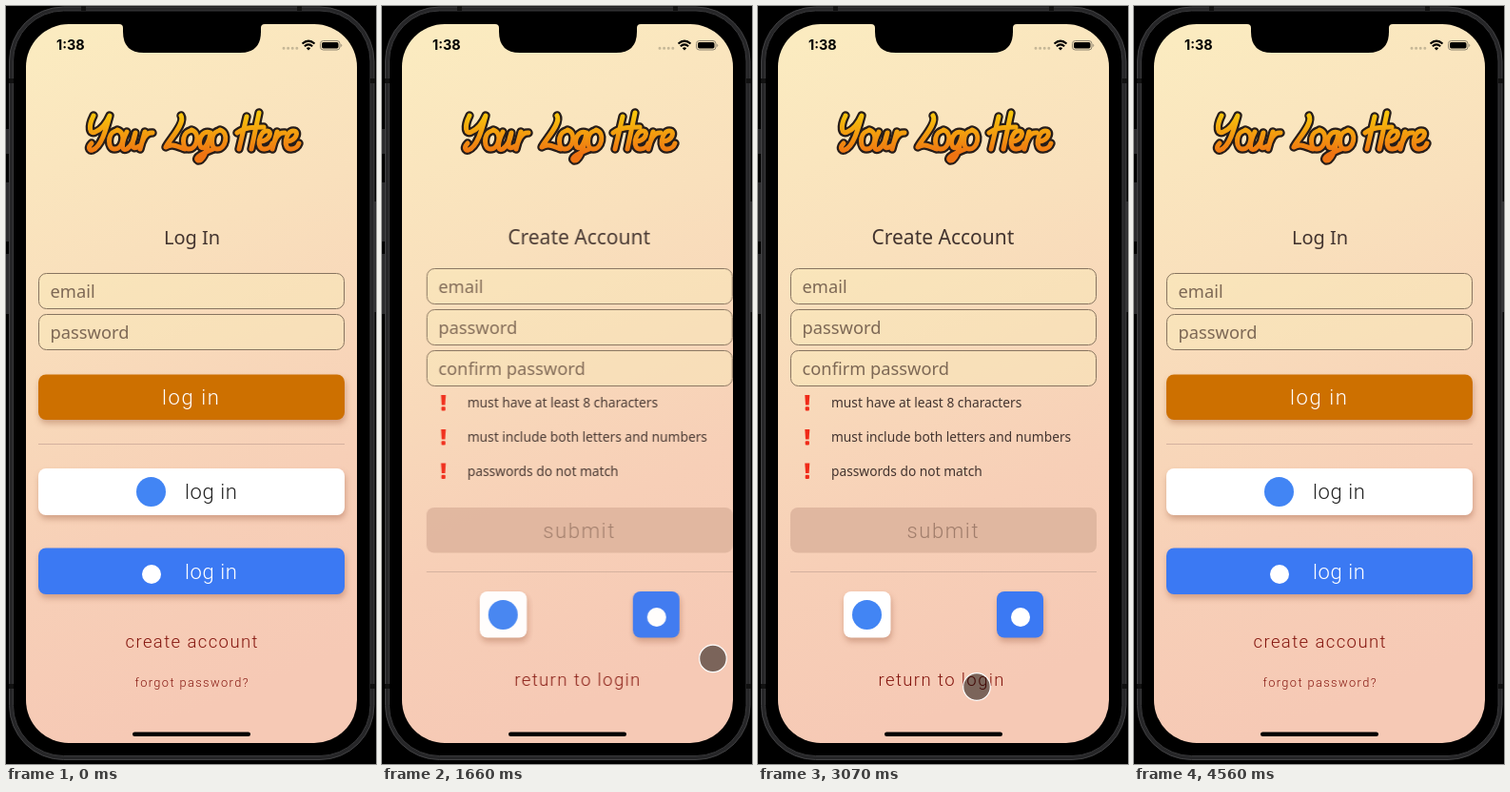
Recreate the animation shown at these times as an HTML page. Size 389 by 795 pixels, loop 4.66 s.

```html
<!DOCTYPE html>
<html lang="en">
<head>
<meta charset="utf-8">
<title>Log in and create account</title>
<style>
  html, body { margin: 0; width: 100%; height: 100%; overflow: hidden; background: #000; }
  svg { display: block; font-family: "Noto Sans", "Open Sans", sans-serif; }
  .title { font-size: 20px; fill: #43342f; }
  .field { fill: #faeab9; fill-opacity: .5; stroke: #87745f; }
  .hint { font-size: 18.3px; fill: #7d6855; }
  .rule { font-size: 13.75px; fill: #43342f; }
  .alert { fill: #f02a18; }
  .line { stroke: #d4b19f; }
  .light, .link { font-family: Roboto, Lato, sans-serif; font-weight: 300; }
  .light { font-size: 22px; letter-spacing: .6px; }
  .wide { letter-spacing: 1.6px; }
  .link { font-size: 18.5px; letter-spacing: 1.4px; fill: #85160f; }
  .small { font-size: 12.8px; }
  .raised { filter: drop-shadow(1px 4px 3px rgba(130, 60, 30, .32)); }
  .blue { fill: #3b79f3; }
  .white { fill: #fff; }
  .mark { fill: #4285f4; }
</style>
</head>
<body>
<svg width="389" height="795" viewBox="0 0 389 795">
  <defs>
    <linearGradient id="sky" gradientUnits="userSpaceOnUse" x1="60" y1="30" x2="325" y2="690">
      <stop offset="0" stop-color="#fbebc0"/>
      <stop offset=".34" stop-color="#f9e0bc"/>
      <stop offset=".73" stop-color="#f7cfb7"/>
      <stop offset="1" stop-color="#f6c9b5"/>
    </linearGradient>
    <linearGradient id="gold" gradientUnits="userSpaceOnUse" x1="0" y1="-37" x2="0" y2="4">
      <stop offset="0" stop-color="#f7c30c"/>
      <stop offset="1" stop-color="#ee7312"/>
    </linearGradient>
    <clipPath id="glass"><rect x="21" y="19" width="348" height="754" rx="45"/></clipPath>

    <!-- script lettering, baseline at 0 -->
    <path id="Y" d="M5-36c-6 12-4 20 2 17c7-3 12-10 15-17c-4 15-9 33-18 36c-4 1-5-3-1-7"/>
    <path id="L" d="M15-36c5 8-13 26-16 33c7-4 12-1 20 2"/>
    <path id="H" d="M8-35l-8 34m21-38l-8 38m-15-17c8-6 18-6 28-6"/>
    <path id="o" d="M4-20c-9 3-8 19-1 19c9 0 13-17 3-20"/>
    <path id="u" d="M2-19c-5 10-7 21 0 18c5-3 8-11 9-17c-3 9-6 20 4 14"/>
    <path id="r" d="M4-19l-5 18c2-9 6-18 13-17"/>
    <path id="e" d="M1-9c9-1 13-11 6-11c-8 0-12 20-2 19c4 0 7-3 8-6"/>
    <path id="g" d="M12-18c-9-4-14 9-10 15c5 4 9-8 10-15c-2 12-6 30-13 29c-5-3 6-8 16-12"/>
    <g id="lettering">
      <use href="#Y" x="87" y="151"/><use href="#o" x="111" y="151"/>
      <use href="#u" x="125" y="151"/><use href="#r" x="142" y="151"/>
      <use href="#L" x="169" y="151"/><use href="#o" x="189" y="151"/>
      <use href="#g" x="203" y="151"/><use href="#o" x="219" y="151"/>
      <use href="#H" x="245" y="151"/><use href="#e" x="267" y="151"/>
      <use href="#r" x="281" y="151"/><use href="#e" x="295" y="151"/>
    </g>
    <g id="alert" class="alert">
      <path d="M49.3 408h5l-.7 10.5h-3.6z"/><rect x="49.7" y="420.3" width="4.2" height="4.2" rx="1"/>
    </g>
  </defs>

  <!-- phone body -->
  <path d="M0 129h4v26h-4zM0 185h4v62h-4zM0 260h4v63h-4zM386 205h3v116h-3z" fill="#2b2b2d"/>
  <rect x="3.5" y="1" width="383.5" height="789.5" rx="57" fill="#262628" stroke="#424244"/>
  <rect x="7.5" y="5" width="375.5" height="781.5" rx="53" fill="#000" stroke="#39393b"/>
  <path d="M3 76h5v5h-5zM383 76h5v5h-5zM3 711h5v5h-5zM383 711h5v5h-5zM79 0h5v5h-5zM306 0h5v5h-5z" fill="#111"/>

  <g clip-path="url(#glass)">
    <rect x="21" y="19" width="348" height="754" fill="url(#sky)"/>
    <g fill="none" stroke-linecap="round" stroke-linejoin="round">
      <use href="#lettering" stroke="#261d1a" stroke-width="9.5"/>
      <use href="#lettering" stroke="url(#gold)" stroke-width="5"/>
    </g>

    <g id="login">
      <text class="title" x="166" y="250">Log In</text>
      <rect class="field" x="34.5" y="280.5" width="321" height="37" rx="8"/>
      <rect class="field" x="34.5" y="323.5" width="321" height="37" rx="8"/>
      <text class="hint" x="46.5" y="306">email</text>
      <text class="hint" x="46.5" y="349">password</text>
      <rect class="raised" x="34" y="386.5" width="322" height="47.5" rx="8" fill="#cd7000"/>
      <text class="light wide white" x="164" y="418">log in</text>
      <path class="line" d="M34 459.5h322"/>
      <rect class="raised white" x="34" y="485" width="322" height="49" rx="8"/>
      <circle class="mark" cx="152.5" cy="509.5" r="15.5"/>
      <text class="light" x="188" y="517" fill="#222">log in</text>
      <rect class="raised blue" x="34" y="568.5" width="322" height="48.5" rx="8"/>
      <circle class="white" cx="153" cy="596" r="10"/>
      <text class="light white" x="188" y="601">log in</text>
      <text class="link" x="125.5" y="673">create account</text>
      <text class="link small" x="135.5" y="714">forgot password?</text>
    </g>

    <g id="create">
      <text class="title" x="119.5" y="250" style="font-size:21px">Create Account</text>
      <rect class="field" x="34.5" y="275.5" width="321" height="37" rx="8"/>
      <rect class="field" x="34.5" y="318.5" width="321" height="37" rx="8"/>
      <rect class="field" x="34.5" y="361.5" width="321" height="37" rx="8"/>
      <text class="hint" x="46.5" y="301">email</text>
      <text class="hint" x="46.5" y="344">password</text>
      <text class="hint" x="46.5" y="387">confirm password</text>
      <use href="#alert"/><use href="#alert" y="36"/><use href="#alert" y="71.5"/>
      <text class="rule" x="77" y="421">must have at least 8 characters</text>
      <text class="rule" x="77" y="457">must include both letters and numbers</text>
      <text class="rule" x="77" y="493">passwords do not match</text>
      <rect x="34" y="526" width="322" height="47.5" rx="8" fill="#e0b7a0"/>
      <text class="light wide" x="156.5" y="558" fill="#a07d6b">submit</text>
      <path class="line" d="M34 593.5h322"/>
      <rect class="raised white" x="90" y="614" width="49.5" height="48.5" rx="8"/>
      <circle class="mark" cx="114.5" cy="638.5" r="15.5"/>
      <rect class="raised blue" x="251" y="614" width="49" height="48.5" rx="8"/>
      <circle class="white" cx="276" cy="641" r="10"/>
      <text id="back" class="link" x="126.5" y="713">return to login</text>
    </g>

    <!-- notch and status bar -->
    <path d="M119 19q4 0 4 4v4q0 22 22 22h101q22 0 22-22v-4q0-4 4-4z"/>
    <text x="53" y="46" style="font:700 14.4px Inter,sans-serif">1:38</text>
    <path d="M292 44.3h15" stroke="#c5b797" stroke-width="3" stroke-linecap="round" stroke-dasharray="0 4.6"/>
    <path d="M311.5 39.5q6.5-5.8 13 0M313.8 42.2q4.2-3.6 8.4 0" fill="none" stroke="#000" stroke-width="2"/>
    <path d="M315.8 44.2q2.2-1.7 4.4 0l-2.2 2.3z"/>
    <rect x="330.5" y="36.5" width="20.5" height="9.5" rx="3" fill="none" stroke="#8d8470"/>
    <rect x="332" y="38" width="17.5" height="6.5" rx="1.7"/>
    <path d="M352.3 39.7q2 1.6 0 3.2z" fill="#8d8470"/>
    <rect x="133" y="761.5" width="124" height="4.5" rx="2.25"/>
  </g>

  <circle id="pointer" r="14.3" fill="#000" fill-opacity=".5" stroke="#fff" stroke-width="1.2"/>
</svg>
<script>
const LOOP = 4660, WIDTH = 348;
const $ = id => document.getElementById(id);
const login = $('login'), create = $('create'), back = $('back'), pointer = $('pointer');

// Each burst of motion: start and tick length, in ms
const bursts = [[600, 350 / 6], [1420, 470 / 8], [2550, 520 / 9], [3430, 510 / 9]];

// Pointer legs: shown from, shown until, move start, duration, x0, y0, x1, y1
const legs = [
  [600, 1420, 600, 350, 367, 678, 222, 675],
  [1420, 1810, 1420, 390, 222, 675, 410, 689],
  [2550, 3430, 2550, 520, 370, 715, 230, 714],
  [3430, 3770, 3490, 280, 230, 714, 370, 714]
];

const smooth = u => u * u * (3 - 2 * u);
const clamp = u => Math.min(1, Math.max(0, u));

// Critically damped spring from 0 to 1
function spring(ms) {
  const u = Math.max(0, ms) * .0188;
  return 1 - (1 + u) * Math.exp(-u);
}

// Hold the time between ticks, rounded up to 10 ms
function hold(t) {
  const burst = bursts.filter(b => b[0] <= t).pop();
  if (!burst) return t;
  const [start, tick] = burst;
  return start + 10 * Math.ceil(Math.floor((t - start) / tick) * tick / 10 - 1e-6);
}

function place(page, x, opacity) {
  page.setAttribute('transform', `translate(${x} 0)`);
  page.setAttribute('opacity', opacity);
}

function draw(now) {
  const t = now % LOOP, h = hold(t);
  const p = t < 1420 ? 0 : t < 3430 ? spring(h - 1387.6) : 1 - spring(h - 3425);
  place(login, -WIDTH * p, 1 - p);
  place(create, WIDTH * (1 - p), p);
  back.setAttribute('opacity', t >= 3130 && t < 3250 ? .7 : 1);

  const leg = legs.find(l => t >= l[0] && t < l[1]);
  pointer.style.display = leg ? '' : 'none';
  if (leg) {
    const [, , start, time, x0, y0, x1, y1] = leg;
    const u = smooth(clamp((h - start) / time));
    pointer.setAttribute('cx', x0 + (x1 - x0) * u);
    pointer.setAttribute('cy', y0 + (y1 - y0) * u);
  }
  requestAnimationFrame(draw);
}
draw(performance.now());
</script>
</body>
</html>
```
